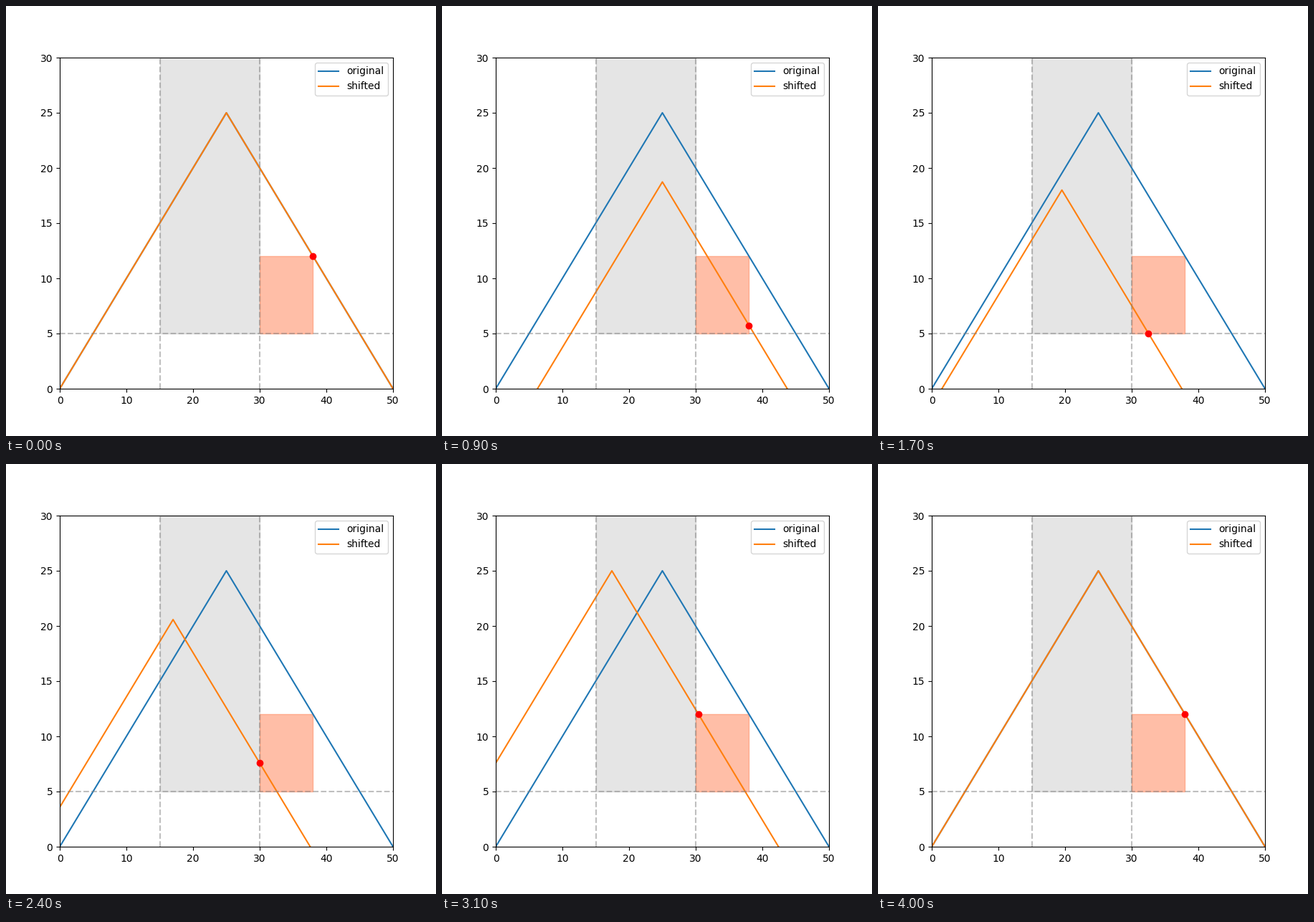
These frames come from a looping animation (600x600 px, 4.05 s). A matplotlib script:

```python
import numpy as np
import matplotlib.pyplot as plt
from matplotlib.animation import FuncAnimation
from matplotlib.patches import Rectangle

STEPS = 20           # points per side, both corners included
LEFT, RIGHT = 30, 38
LOW, HIGH = 5, 12

# The dot walks round the box, pausing one step on each corner.
corners = [(RIGHT, HIGH), (RIGHT, LOW), (LEFT, LOW), (LEFT, HIGH), (RIGHT, HIGH)]
sides = [np.linspace(a, b, STEPS) for a, b in zip(corners, corners[1:])]
path = np.vstack([[corners[0]], *sides])

tent_x = np.array([0, 25, 50])
tent_y = np.array([0, 25, 0])

fig, ax = plt.subplots(figsize=(6, 6), dpi=100)
ax.set_xlim(0, 50)
ax.set_ylim(0, 30)

ax.plot(tent_x, tent_y, color="C0", label="original")
shifted, = ax.plot(tent_x, tent_y, color="C1", label="shifted")

guide = dict(color="gray", linestyle="--", alpha=0.5)
ax.axvline(15, **guide)
ax.axvline(30, **guide)
ax.axhline(LOW, **guide)

ax.add_patch(Rectangle((15, LOW), 15, 25, color="gray", alpha=0.2))
ax.add_patch(Rectangle((LEFT, LOW), RIGHT - LEFT, HIGH - LOW,
                       color="coral", alpha=0.5))
dot, = ax.plot([RIGHT], [HIGH], "ro")
ax.legend(loc="upper right")


def update(i):
    x, y = path[i]
    shifted.set_data(tent_x + x - RIGHT, tent_y + y - HIGH)
    dot.set_data([x], [y])
    return shifted, dot


anim = FuncAnimation(fig, update, frames=len(path), interval=50, repeat=True)
plt.show()
```
